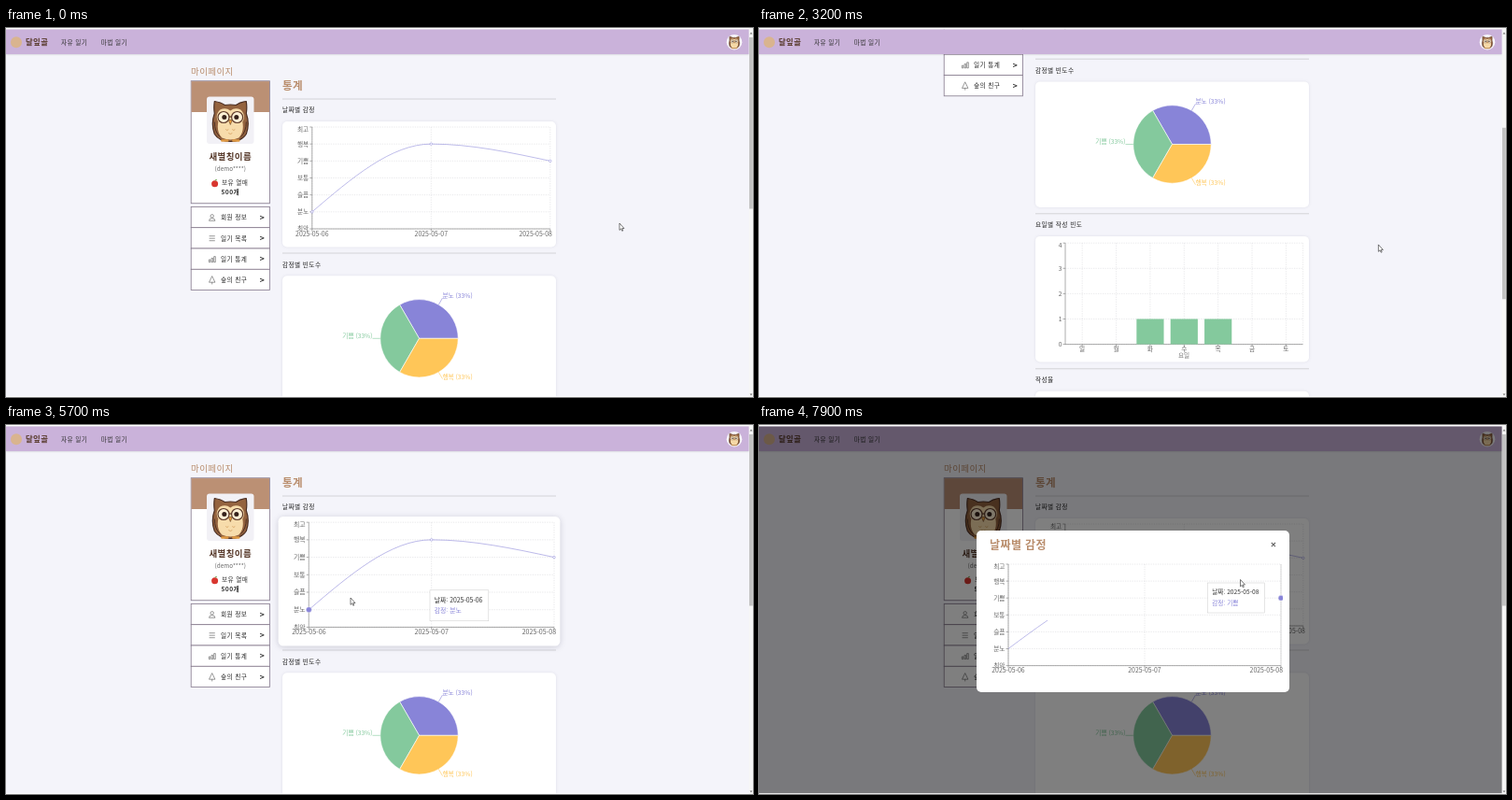
An HTML page for the animation above (8000 ms loop, 800 by 395 pixels).

```html
<!DOCTYPE html>
<html lang="ko">
<head>
<meta charset="utf-8">
<title>통계</title>
<style>
html, body { margin: 0; width: 100%; height: 100%; overflow: hidden; background: #fff; }
svg { display: block; width: 100vw; height: 100vh; }
text { font-family: "Noto Sans CJK KR", "Noto Sans CJK JP", "Noto Sans CJK", "Noto Sans", sans-serif; white-space: pre; }
.wide { letter-spacing: .4px; }
.card { fill: #fff; filter: drop-shadow(0 .8px 1.6px rgba(40, 40, 70, .1)); }
.grid { stroke: #d2d2d6; stroke-width: .5; stroke-dasharray: 1.25 1.25; fill: none; }
.axis { stroke: #777; stroke-width: .6; fill: none; }
.curve { stroke: #8884d8; stroke-width: .55; fill: none; }
.rule { stroke: #c9c9ce; stroke-width: .8; }
.box { fill: #fff; stroke: #85798c; stroke-width: .8; }
.icon { fill: none; stroke: #555; stroke-width: .6; }
</style>
</head>
<body>
<svg id="stage" viewBox="0 0 800 395" xmlns="http://www.w3.org/2000/svg"></svg>
<script>
const LOOP = 8000, STEP = 100;
const PURPLE = '#8884d8', GREEN = '#84c99d', YELLOW = '#ffc658', BROWN = '#b98d6c', INK = '#333';
const MOODS = ['최고', '행복', '기쁨', '보통', '슬픔', '분노', '최악'];
const DAYS = ['일', '월', '화', '수', '목', '금', '토'];
const LEVELS = [5, 1, 2];
const BRAND = '달잎골';
const date = i => '2025-05-0' + (6 + i);

// Drawing helpers
const text = (x, y, s, o = {}) =>
  `<text x="${x}" y="${y}" dy="${o.dy ?? '.36em'}" font-size="${o.size || 6.67}" fill="${o.fill || INK}"` +
  ` font-weight="${o.weight || 400}" text-anchor="${o.anchor || 'start'}" class="${o.wide ? 'wide' : ''}">${s}</text>`;
const rect = (x, y, w, h, fill, rx = 0) =>
  `<rect x="${x}" y="${y}" width="${w}" height="${h}" rx="${rx}" fill="${fill}"/>`;
const path = (d, cls, extra = '') => `<path d="${d}" class="${cls}" ${extra}/>`;
const circle = (x, y, r, fill, extra = '') => `<circle cx="${x}" cy="${y}" r="${r}" fill="${fill}" ${extra}/>`;
const card = y => `<rect x="296" y="${y}" width="293" height="134.5" rx="5" class="card"/>`;
const rule = y => path(`M296 ${y}H589`, 'rule');
const heading = (y, s) => text(296, y, s, { wide: 1, weight: 500, fill: '#222' });

function axes(x0, x1, y0, y1, xs, rows, labels) {
  let s = '';
  for (let i = 0; i <= rows; i++) {
    const y = y0 + (y1 - y0) * i / rows;
    s += path(`M${x0} ${y}H${x1}`, 'grid') + path(`M${x0 - 2.5} ${y}h2.5`, 'axis') +
      text(x0 - 3.6, i ? y : y + 2.6, labels[i], { anchor: 'end', fill: '#666' });
  }
  for (const x of xs) s += path(`M${x} ${y0}V${y1}`, 'grid') + path(`M${x} ${y1}v2.5`, 'axis');
  return s + path(`M${x0} ${y0}V${y1}H${x1}`, 'axis');
}

function lineChart(b, id, dots) {
  const xs = [b.x0, (b.x0 + b.x1) / 2, b.x1];
  const ys = LEVELS.map(v => b.y0 + (b.y1 - b.y0) * v / 6);
  const d = (b.x1 - b.x0) / 6;
  let s = axes(b.x0, b.x1, b.y0, b.y1, xs, 6, MOODS);
  xs.forEach((x, i) => {
    s += text(i == 2 ? x + 2 : x, b.y1 + 5.2, date(i), { anchor: i == 2 ? 'end' : 'middle', size: 6.9, fill: '#666' });
  });
  s += `<path id="${id}Bar" stroke="#ccc" stroke-width=".7"/>`;
  s += path(`M${xs[0]} ${ys[0]}C${xs[0] + d} ${(ys[0] + ys[1]) / 2} ${xs[1] - d} ${ys[1]} ${xs[1]} ${ys[1]}` +
    `S${xs[2] - d} ${(ys[1] + ys[2]) / 2} ${xs[2]} ${ys[2]}`, 'curve', `id="${id}Curve" pathLength="100"`);
  if (dots) xs.forEach((x, i) => s += circle(x, ys[i], 1.25, '#fff', `stroke="${PURPLE}" stroke-width=".5"`));
  s += circle(0, 0, 2.9, PURPLE, `id="${id}Dot" stroke="#fff" stroke-width=".4"`);
  b.xs = xs; b.ys = ys;
  return s;
}

function pie(cy, slices) {
  const cx = 442.5, r = 41.7;
  const at = (a, k) => [cx + k * Math.cos(a), cy - k * Math.sin(a)].map(v => v.toFixed(2));
  let a = 0, s = '';
  for (const [name, part, color, label] of slices) {
    const end = a + part * Math.PI * 2, mid = (a + end) / 2;
    if (part == 1) s += circle(cx, cy, r, color);
    else s += `<path d="M${cx} ${cy}L${at(a, r)}A${r} ${r} 0 0 0 ${at(end, r)}Z" fill="${color}" stroke="#fff" stroke-width=".6"/>`;
    const [x, y] = at(mid, r + 8.3);
    s += `<path d="M${at(mid, r)}L${x} ${y}" stroke="${label || color}" stroke-width=".6"/>` +
      text(x, y, name, { dy: 0, fill: label || color, anchor: Math.cos(mid) < 0 ? 'end' : 'start' });
    a = end;
  }
  return s;
}

function barChart() {
  const x0 = 328, x1 = 582.6, y0 = 438, y1 = 546.4, band = (x1 - x0) / 7;
  const xs = DAYS.map((_, i) => x0 + band * (i + .5));
  let s = axes(x0, x1, y0, y1, xs, 4, [4, 3, 2, 1, 0]) + path(`M${x1} ${y0}V${y1}`, 'grid');
  DAYS.forEach((d, i) => {
    if (i > 1 && i < 5) s += rect(xs[i] - 14.6, y1 - 27.1, 29.2, 27.1, GREEN);
    s += text(xs[i], y1 + 5.4, d, { anchor: 'middle', fill: '#666' });
  });
  return s + text(455, 558.3, '요일', { anchor: 'middle', fill: '#777' });
}

const owl = `<g id="owl" stroke-linejoin="round">
  <path d="M-17-21Q-10-20-6-17Q0-18 6-17Q10-20 17-21Q18-14 17-8Q21 3 17 14Q12 22 0 22Q-12 22-17 14Q-21 3-17-8Q-18-14-17-21Z" fill="#94633f" stroke="#4b2e22" stroke-width="1.2"/>
  <path d="M0-11Q5-15 11-12Q17-6 13 1Q15 12 9 18Q0 22-9 18Q-15 12-13 1Q-17-6-11-12Q-5-15 0-11Z" fill="#f7dcab"/>
  <path d="M-17 1Q-17 12-11 17M17 1Q17 12 11 17" fill="none" stroke="#4b2e22" stroke-width="1"/>
  <g fill="#fff1d6" stroke="#5b3828" stroke-width="1.2"><circle cx="-7.3" cy="-4" r="6"/><circle cx="7.3" cy="-4" r="6"/><path d="M-1.5-4.5h3"/></g>
  <g fill="#35221b"><circle cx="-6.5" cy="-4" r="2.5"/><circle cx="6.5" cy="-4" r="2.5"/></g>
  <path d="M-2-1H2L0 4Z" fill="#f0a13c" stroke="#4b2e22" stroke-width=".5"/>
  <path d="M-5 9q1.5 2 3 0M2 9q1.5 2 3 0M-2 13q2 2 4 0" fill="none" stroke="#d9a566" stroke-width=".9"/>
  <path d="M-9 21h6M3 21h6" stroke="#e09a44" stroke-width="2.4" stroke-linecap="round"/></g>`;

function sidebar() {
  const icons = [
    'M219 201.3a1.7 1.7 0 1 0 3.4 0a1.7 1.7 0 1 0-3.4 0M217.5 206.3q0-2.6 3.2-2.6t3.2 2.6z',
    'M217.6 222.7h6.2M217.6 225.2h6.2M217.6 227.7h6.2',
    'M217.3 250.6v-2.6h1.6v2.6zM220 250.6v-4.2h1.6v4.2zM222.7 250.6v-6h1.6v6z',
    'M220.7 265.6l-3.2 6.6h6.4zM220.7 272.2v2.2'];
  const center = (y, s, o) => text(240.3, y, s, { anchor: 'middle', ...o });
  let s = text(198, 47, '마이페이지', { size: 9.5, wide: 1, weight: 500, fill: BROWN }) +
    '<rect x="198.2" y="56.7" width="84.2" height="131" class="box"/>' +
    rect(198.6, 57.1, 83.4, 32.9, '#bb9074') + rect(215, 73.5, 50.5, 50.5, '#f2f1f6', 3) +
    '<use href="#owl" x="240.3" y="99.5"/>' +
    center(138, '새별칭이름', { size: 9.5, wide: 1, weight: 700, fill: '#563829' }) +
    center(150.2, '(demo****)', { fill: '#666', size: 6.4 }) +
    circle(223.6, 166.8, 3.5, '#d8362f') +
    '<path d="M223.6 163.6q.3-1.8 2.4-1.8q-.2 2-2.4 1.8" fill="#5a9a3c"/>' +
    text(231, 166, '보유 열매', { wide: 1 }) + center(176, '500개', { weight: 700, wide: 1 });
  ['회원 정보', '일기 목록', '일기 통계', '숲의 친구'].forEach((name, i) => {
    const y = 191.4 + 22.3 * i;
    s += `<rect x="198.2" y="${y}" width="84.2" height="22.3" class="box"/>` + path(icons[i], 'icon') +
      text(230, y + 11.5, name, { wide: 1, weight: 500, fill: '#222' }) +
      text(271.8, y + 11.3, '&gt;', { size: 8.5, weight: 700 });
  });
  return s;
}

const tooltip = id => `<g id="${id}Tip"><rect width="61" height="32" fill="#fff" stroke="#ccc" stroke-width=".5"/>` +
  `<g id="${id}Date">${text(4.6, 10, '')}</g><g id="${id}Mood">${text(4.6, 21.5, '', { fill: PURPLE })}</g></g>`;

const main = { x0: 327.8, x1: 582.8, y0: 106, y1: 215 };
const zoom = { x0: 267, x1: 559, y0: 149, y1: 257.6 };
const third = 1 / 3;

stage.innerHTML = `<defs>${owl}<clipPath id="zoomClip"><rect x="240" y="140" width="321" height="140"/></clipPath></defs>
${rect(0, 0, 800, 395, '#f4f4fa')}
<g id="page">
  ${sidebar()}
  ${text(296, 62, '통계', { size: 11.6, weight: 700, wide: 1, fill: BROWN })}
  ${rule(76)}${heading(88, '날짜별 감정')}
  ${rule(241)}${heading(253.2, '감정별 빈도수')}${card(265.2)}
  ${pie(332.3, [['분노 (33%)', third, PURPLE], ['기쁨 (33%)', third, GREEN], ['행복 (33%)', third, YELLOW]])}
  ${rule(406.6)}${heading(418.6, '요일별 작성 빈도')}${card(430.7)}${barChart()}
  ${rule(572.6)}${heading(584.2, '작성율')}${card(596.6)}
  ${pie(663.5, [['작성 (100%)', 1, GREEN], ['미작성 (0%)', 0, '#fff', '#e0a39a']])}
  <g id="hover">${card(100)}${lineChart(main, 'main', true)}</g>
  ${tooltip('main')}
  ${rect(0, 764.8, 796, 60, '#ffd466')}
  ${text(395.5, 786.8, `<tspan font-weight="500">NOVREP :</tspan>  ${BRAND}`, { size: 5.4, anchor: 'middle', fill: '#666' })}
  ${text(396.5, 799, '© 2025. Yoon TaeSeong, Lim KangWoo All rights reserved.', { size: 5.1, anchor: 'middle', fill: '#777' })}
</g>
<g style="filter:drop-shadow(0 .8px 1px rgba(0,0,0,.22))">${rect(0, 1.3, 796, 26.7, '#cab2da')}</g>
${circle(11, 15.2, 6, '#d9b48f')}
${text(21, 15.2, BRAND, { size: 8.4, weight: 700, wide: 1, fill: '#563829' })}
${text(59, 15.2, '자유 일기', { wide: 1 })}${text(101.7, 15.2, '마법 일기', { wide: 1 })}
${circle(780, 15.2, 8.3, '#f8f6fa')}<use href="#owl" transform="translate(780 15.4) scale(.3)"/>
<g id="modal">
  ${rect(0, 1.3, 796, 394, 'rgba(0,0,0,.5)')}
  ${rect(233, 113, 335, 173, '#fff', 5)}
  ${text(247, 128.2, '날짜별 감정', { size: 12, weight: 700, wide: 1, fill: BROWN })}
  <path d="M548.8 126l4.2 4.2M553 126l-4.2 4.2" stroke="#666" stroke-width="1.1"/>
  <g clip-path="url(#zoomClip)">${lineChart(zoom, 'zoom', false)}</g>
  ${tooltip('zoom')}
</g>
${rect(0, 0, 800, 1.3, '#fff')}${rect(0, 394.2, 800, .8, '#fff')}
${rect(795.6, 0, 4.4, 395, '#f6f6f6')}
<path d="M796.6 6.6l1.4-2 1.4 2zM796.6 391.6l1.4 2 1.4-2z" fill="#777"/>
<rect id="thumb" x="796" width="3.8" height="183.5" fill="#c1c1c1"/>
<path id="cursor" d="M0 0V7.4L1.7 5.9 2.8 8.3 3.8 7.9 2.8 5.5H5Z" fill="#fff" stroke="#222" stroke-width=".6"/>`;

// Motion
const $ = id => document.getElementById(id);
const clamp = v => Math.min(1, Math.max(0, v));
const mix = (a, b, p) => a + (b - a) * p;

// CSS "ease": cubic-bezier(.25, .1, .25, 1)
function ease(x) {
  x = clamp(x);
  let lo = 0, hi = 1;
  for (let i = 0; i < 20; i++) {
    const u = (lo + hi) / 2, v = 1 - u;
    .75 * u * v + u ** 3 < x ? lo = u : hi = u;
  }
  return .3 * lo * (1 - lo) ** 2 + 3 * lo * lo * (1 - lo) + lo ** 3;
}

function track(keys, t, k = 1) {
  let i = 1;
  while (i < keys.length - 1 && keys[i][0] < t) i++;
  const a = keys[i - 1], b = keys[i];
  return mix(a[k], b[k], clamp((t - a[0]) / (b[0] - a[0])));
}

const BOTTOM = 421;
const scrollKeys = [[500, 0], [1100, 161], [1950, BOTTOM], [2500, BOTTOM], [3600, 86], [3900, 0]];
const mouse = [
  [2500, 657, 209], [3600, 667, 245], [4100, 667, 245], [4600, 589, 222], [4800, 535, 192],
  [5000, 478, 176], [5300, 440, 170], [5600, 394, 173], [5700, 369, 185], [5900, 350, 188],
  [6200, 365, 186], [6450, 391, 180], [6950, 522, 160], [7200, 545, 155], [7400, 530, 154],
  [7460, 520, 157], [7600, 515.5, 165.5]];
// [time, active day, tooltip left]
const picks = [[4600, 2, 520], [4850, 1, 460], [5675, 0, 328], [6450, 1, 460], [6950, 2, 520], [7455, 1, 460]];
const ENTER = 4600, OPEN = 7700;

function mark(id, b, i, show) {
  for (const part of ['Bar', 'Dot']) $(id + part).style.display = show ? '' : 'none';
  $(id + 'Bar').setAttribute('d', `M${b.xs[i]} ${b.y0}V${b.y1}`);
  $(id + 'Dot').setAttribute('transform', `translate(${b.xs[i]} ${b.ys[i]})`);
}

function tip(id, i, x, y, scale, show) {
  $(id + 'Tip').style.display = show ? '' : 'none';
  $(id + 'Tip').setAttribute('transform', `translate(${x} ${y}) scale(${scale})`);
  $(id + 'Date').firstChild.textContent = '날짜: ' + date(i);
  $(id + 'Mood').firstChild.textContent = '감정: ' + MOODS[LEVELS[i]];
}

function draw(t) {
  const scroll = track(scrollKeys, t);
  $('page').setAttribute('transform', `translate(0 ${-scroll})`);
  $('thumb').setAttribute('y', 10 + scroll * 196 / BOTTOM);
  $('cursor').setAttribute('transform', `translate(${track(mouse, t)} ${track(mouse, t, 2)})`);

  const inside = t >= ENTER && t < OPEN;
  const grow = t < OPEN ? ease((t - ENTER) / 300) : 1 - ease((t - OPEN + 100) / 300);
  const k = 1 + .03 * grow;
  $('hover').setAttribute('transform', `translate(442.5 167.2) scale(${k}) translate(-442.5 -167.2)`);
  $('hover').firstChild.style.filter =
    `drop-shadow(0 ${.8 + .8 * grow}px ${1.6 + 1.4 * grow}px rgba(40,40,70,${.1 + .1 * grow}))`;

  let n = 0;
  while (n < picks.length - 1 && picks[n + 1][0] <= t) n++;
  const [since, day, left] = picks[n];
  const x = mix(picks[Math.max(0, n - 1)][2], left, ease((t - since) / 400));
  mark('main', main, day, inside);
  tip('main', day, x, track(mouse, t - 120, 2) + 4, 1.03, inside);

  $('modal').style.display = t >= OPEN ? '' : 'none';
  $('zoomCurve').setAttribute('stroke-dasharray', `${100 * ease((t - OPEN + 10) / 1500)} 200`);
  mark('zoom', zoom, 2, t > OPEN);
  tip('zoom', 2, mix(417, 494, ease((t - OPEN + 10) / 400)), 169, 1, t > OPEN);
}

function frame() {
  const t = performance.now() % LOOP;
  draw(Math.floor(t / STEP) * STEP);
  requestAnimationFrame(frame);
}
frame();
</script>
</body>
</html>
```
